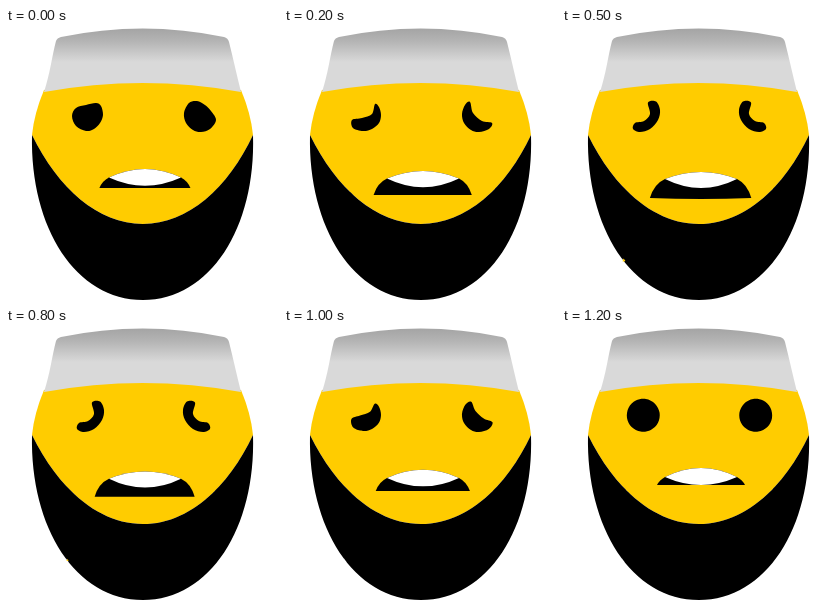
An HTML page that plays this animation: 272 px wide and 272 px high, repeating every 1400 ms.

```html
<!DOCTYPE html>
<html lang="en">
<head>
<meta charset="utf-8">
<title>Sleepy face</title>
<style>
html, body { margin: 0; width: 100%; height: 100%; overflow: hidden; background: #fff; }
svg { display: block; width: 100vw; height: 100vh; }
</style>
</head>
<body>
<svg viewBox="0 0 272 272">
  <defs>
    <linearGradient id="felt" gradientUnits="userSpaceOnUse" x1="0" y1="2" x2="0" y2="34">
      <stop offset="0" stop-color="#a6a6a6"/>
      <stop offset=".35" stop-color="#b4b4b4"/>
      <stop offset="1" stop-color="#d9d9d9"/>
    </linearGradient>
  </defs>
  <path fill="#fc0" d="M38 62Q28 86 26 107C52 160 92 196 137 196S222 160 247 107Q245 86 235 62Q137 44 38 62Z"/>
  <path d="M26 107C24 200 70 272 137 272S250 200 247 107C222 160 182 196 137 196S52 160 26 107Z"/>
  <path fill="url(#felt)" d="M38 64C44 46 46 28 50 13Q51 10 55 9Q137 -8 218 9Q222 10 223 14C227 30 231 48 235 64Q137 46 38 64Z"/>
  <path id="speck" fill="#fc0"/>
  <path id="left"/>
  <path id="right" transform="matrix(-1 0 0 1 275 0)"/>
  <path id="lips"/>
  <path id="teeth" fill="#fff"/>
</svg>
<script>
const $ = id => document.getElementById(id);
const lerp = (a, b, t) => a + (b - a) * t;

// Eye outlines run clockwise from the upper tip; the right eye is mirrored.
const open = Array.from({ length: 10 }, (_, i) => {
  const a = (45 + 36 * (i - 2.5)) * Math.PI / 180;
  return [81.3 + 16.5 * Math.cos(a), 87.3 + 16.5 * Math.sin(a)];
});
const thin = [[95,77],[97,85],[96,93],[89,101],[79,104],[70,101],[69,95],[80,96],[88,88],[90,75]];
const shut = [[94,73.5],[98,82],[96,92],[88,101],[78,104],[71,101],[73,95],[82,93],[88,86],[86,74.5]];
const leftEye = [
  open,
  [[95,78],[97,87],[94,95],[88,101],[80,103],[70,98],[66,88],[70,80],[80,77],[90,75]],
  [[95,79],[97,87],[95,95],[88,101],[79,103],[69,100],[68,92],[78,90],[88,86],[91,76]],
  thin, shut
];
const rightEye = [
  open,
  [[92,75],[97,85],[95,95],[88,102],[80,104],[71,101],[65,92],[70,83],[76,77],[84,73]],
  [[94,77],[97,86],[95,95],[88,102],[80,104],[70,101],[67,95],[77,93],[86,85],[89,74]],
  thin, shut
];

// Start in ms, eye pose (0 open, 4 shut), mouth opening, speck size
const steps = [
  [0, 1, .22, 0], [100, 1.55, .48, 0], [200, 2, .74, 0], [300, 3, 1, 4],
  [400, 3.6, 1, 3.5], [500, 4, .97, 3], [700, 4, .93, 2.5], [800, 4, .87, 2],
  [900, 2.8, .68, 0], [1000, 1.75, .45, 0], [1100, .9, .2, 0], [1200, 0, 0, 0]
];

function smooth(p) {
  const n = p.length, at = i => p[(i + n) % n];
  let d = `M${at(0)}`;
  for (let i = 0; i < n; i++) {
    const [a, b, c, e] = [at(i - 1), at(i), at(i + 1), at(i + 2)];
    const c1 = b.map((v, k) => v + (c[k] - a[k]) / 6);
    const c2 = c.map((v, k) => v - (e[k] - b[k]) / 6);
    d += `C${c1} ${c2} ${c}`;
  }
  return d + 'Z';
}

function eye(poses, k) {
  const i = Math.min(3, Math.floor(k));
  return smooth(poses[i].map((p, j) => p.map((v, c) => lerp(v, poses[i + 1][j][c], k - i))));
}

function drawMouth(m) {
  const y = 157 + 13.5 * m, l = 95 - 7.3 * m, r = 183 + 6.5 * m;
  const joint = 149 + 2 * m, peak = 2 * lerp(140, 144, m) - joint;
  const bend = lerp(2.5, 4, m), cy = joint + lerp(3, 5, m);
  const top = `Q139 ${peak} 175 ${joint}`;
  const sag = Math.max(0, m - .9) * 25;
  $('lips').setAttribute('d',
    `M${l} ${y}Q${l + bend} ${cy} 103 ${joint}${top}Q${r - bend} ${cy} ${r} ${y}Q139 ${y + sag} ${l} ${y}Z`);
  $('teeth').setAttribute('d',
    `M103 ${joint}${top}Q139 ${2 * lerp(157, 160, m) - joint} 103 ${joint}Z`);
}

let shown;
function frame(now) {
  const t = now % 1400;
  const step = steps.findLast(s => s[0] <= t) || steps[0];
  if (step !== shown) {
    shown = step;
    const [, k, m, s] = step;
    $('left').setAttribute('d', eye(leftEye, k));
    $('right').setAttribute('d', eye(rightEye, k));
    drawMouth(m);
    $('speck').setAttribute('d', s ? `M61.3 ${232 - s / 2}l${s * .7} ${s * .7}l-1 ${s * .3}h${-s * .6}Z` : '');
  }
}

const start = performance.now();
function tick() {
  frame(performance.now() - start);
  requestAnimationFrame(tick);
}
tick();
</script>
</body>
</html>
```
